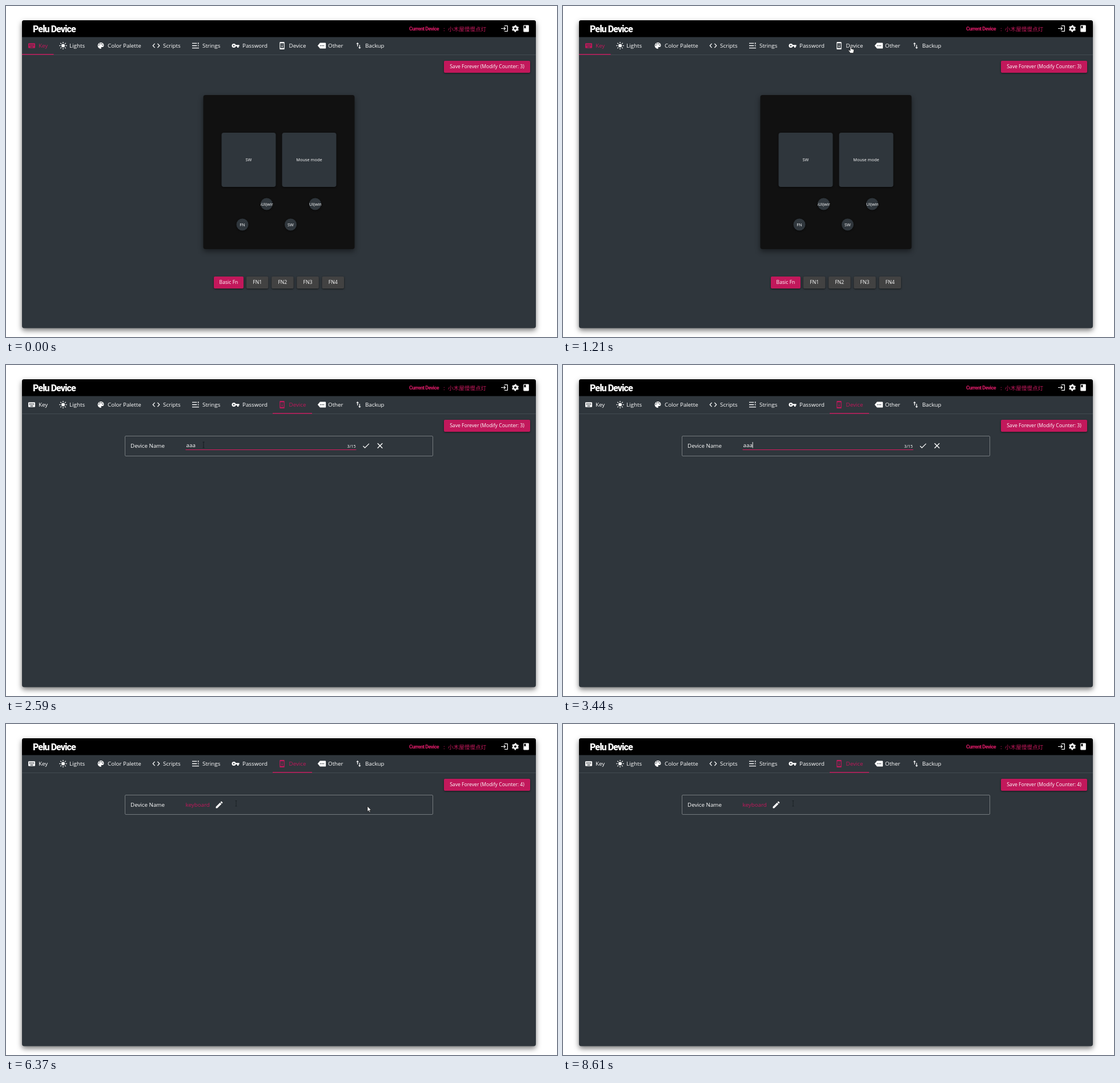
Write an HTML page that moves like this. It is 965x580 px and loops after 9.3 s.

```html
<!DOCTYPE html>
<html lang="en">
<head>
<meta charset="utf-8">
<title>Device settings</title>
<style>
  html, body { margin: 0; width: 100%; height: 100%; overflow: hidden; background: #fff; }
  svg { display: block; font: 9.8px "Open Sans", "Noto Sans", sans-serif; fill: #fff; }
  .pink { fill: #c2185b; }
  .window { filter: drop-shadow(0 4px 5px #0008); }
  .raised { filter: drop-shadow(0 1px 1.5px #0009); }
  .panel { filter: drop-shadow(0 4px 5px #0007); }
  .black { font-family: Roboto, sans-serif; font-weight: 900; }
  .button { font-size: 8.65px; font-weight: 500; text-anchor: middle; }
  .small { font-size: 7.4px; text-anchor: middle; }
  .tab.on { fill: #c2185b; color: #c2185b; }
  .tab { color: #fff; }
  .tab .bar { visibility: hidden; }
  .tab.on .bar { visibility: visible; }
  .line { fill: none; stroke: currentColor; stroke-width: 2.1; }
  .beam { fill: none; stroke: #14191d; stroke-width: .9; }
</style>
</head>
<body>
<svg width="965" height="580" viewBox="0 0 965 580">
  <rect class="window" x="28" y="25" width="900" height="539.5" rx="4" fill="#2f363c"/>
  <path d="M28 54.5V29q0-4 4-4H924q4 0 4 4V54.5z" fill="#000"/>
  <path d="M28 85.5H928" stroke="#424a50"/>
  <text class="black" x="47" y="45.5" font-size="16" letter-spacing="-.95">Pelu Device</text>
  <text class="black pink" x="706" y="43" font-size="9" letter-spacing="-.6">Current Device</text>
  <text class="pink" x="766" y="43.5" font-size="9.6" font-family="Noto Sans CJK SC, Noto Sans CJK, sans-serif">:</text>
  <text class="pink" x="774" y="43.5" font-size="9.6" font-family="Noto Sans CJK SC, Noto Sans CJK, sans-serif">小木屋慢慢点灯</text>
  <g id="headerIcons" color="#fff"></g>
  <g id="tabs"></g>
  <g id="save"></g>

  <g id="keyPage">
    <rect class="panel" x="345.5" y="156" width="265" height="270" rx="4" fill="#111"/>
    <g id="keys"></g>
    <g id="layers"></g>
  </g>

  <g id="devicePage">
    <rect id="row" x="208.5" y="124.5" width="539" height="34" rx="1.5" fill="none" stroke="#747a7e"/>
    <text x="218" y="145">Device Name</text>
    <g id="view">
      <text id="name" class="pink" x="314.5" y="145"></text>
      <g id="pencil"></g>
    </g>
    <g id="edit" color="#fff">
      <rect id="selection" x="315" y="135" width="16" height="11.5" fill="#2a6fc4"/>
      <text id="input" x="315.5" y="144"></text>
      <path id="composing" d="M315.5 146.5H368" stroke="#fff" stroke-width=".8" stroke-dasharray="1 1"/>
      <path id="caret" d="M0 135V145.5" stroke="#fff" stroke-width=".9"/>
      <path d="M314.5 148.5H613.5" stroke="#d81b60" stroke-width="1.2"/>
      <text id="count" x="612.5" y="144.6" font-size="7.2" text-anchor="end"></text>
      <g id="editIcons"></g>
    </g>
    <path id="restingBeam" class="beam" opacity=".75" d="M401.5 134.5h3M403 134.5v9.5M401.5 144h3"/>
    <circle id="badge" cx="315.5" cy="122.5" r="8.3" fill="#2d9cbd"/>
  </g>

  <g id="arrow" stroke="#111" stroke-width=".7">
    <path d="M0 0V9.5L2.2 7.5 3.7 11 5.2 10.3 3.7 7H6.5z"/>
  </g>
  <g id="hand" stroke="#111" stroke-width=".7">
    <path d="M-1 1Q0-1 1 1V5L4.5 6Q5.8 6.5 5.5 8L4.6 12.5H-.8L-3.8 8.4Q-4 6.8-2.4 7.2L-1 8.5z"/>
  </g>
  <path id="beam" class="beam" d="M-1.5-5h3M0-5V5M-1.5 5h3"/>
</svg>

<script>
const LOOP = 9300, STEPS = 54;
const $ = id => document.getElementById(id);

// Icons on a 24-unit grid; entries that begin with "<" are ready markup.
const dot = (x, y, s = 2) => `M${x} ${y}h${s}v${s}h-${s}z`;
const line = d => `<path class="line" d="${d}"/>`;
const rays = [...Array(8).keys()].map(i =>
  `<path class="line" d="M12 1V4.5" transform="rotate(${i * 45} 12 12)"/>`).join('');
const ICONS = {
  keyboard: 'M4 5H20q2 0 2 2V17q0 2-2 2H4q-2 0-2-2V7q0-2 2-2z' +
    [5, 8, 11, 14, 17].map(x => dot(x, 8) + dot(x, 11)).join('') + 'M8 15h8v2H8z',
  sun: `<circle cx="12" cy="12" r="5"/>${rays}`,
  palette: 'M12 3a9 9 0 0 0 0 18q1.5 0 1.5-1.5 0-.6-.4-1-1.2-2.2 1.1-2.5H16a5 5 0 0 0 5-5c0-4.4-4-8-9-8z' +
    [[5, 9], [8, 5], [13, 5], [16, 9]].map(([x, y]) => `M${x} ${y + 1.5}a1.5 1.5 0 0 1 3 0a1.5 1.5 0 0 1-3 0z`).join(''),
  code: line('M8 6L2.5 12 8 18M16 6l5.500 6L16 18'),
  list: line('M2 5H16M2 12H16M2 19H22M20 3V8M20 10.500V14'),
  key: 'M12.650 10A6 6 0 1 0 12.650 14H17v4h4v-4h2v-4zM5 12a2 2 0 0 1 4 0a2 2 0 0 1-4 0z',
  phone: 'M7 1H17q2 0 2 2V21q0 2-2 2H7q-2 0-2-2V3q0-2 2-2zM7 5V19H17V5z' + dot(11, 7) + 'M11 11h2v6h-2z',
  label: 'M7 3.500H22q2 0 2 2v13q0 2-2 2H7L0 12z' + [7.5, 12, 16.5].map(x => dot(x, 10.8, 2.4)).join(''),
  swap: 'M9 3L5 7H8V14h2V7h3zM16 17V10H14v7H11l4 4 4-4z',
  login: 'M11 7L9.600 8.400 12.200 11H2v2H12.200L9.600 15.600 11 17l5-5zM12 3H20q2 0 2 2V19q0 2-2 2H12V19h8V5H12z',
  gear: '<g fill="none" stroke="currentColor"><circle cx="12" cy="12" r="5.600" stroke-width="4.600"/>' +
    '<circle cx="12" cy="12" r="8.600" stroke-width="3" pathLength="12" stroke-dasharray="1" transform="rotate(15 12 12)"/></g>',
  book: 'M6 2H18q2 0 2 2V20q0 2-2 2H6q-2 0-2-2V4q0-2 2-2zM6 4v8l2.500-1.500L11 12V4z',
  pencil: 'M3 17.250V21H6.750L17.800 9.950 14.050 6.200zM20.700 7q.7-.7 0-1.400L18.400 3.300q-.7-.7-1.400 0L15.100 5.100 18.900 8.900z',
  check: 'M9 16.200L4.800 12 3.400 13.400 9 19 21 7 19.600 5.600z',
  cross: line('M5.500 5.500l13 13M18.500 5.500l-13 13'),
};
function icon(name, x, y, scale = .6) {
  const art = ICONS[name];
  const body = art[0] === '<' ? art : `<path fill-rule="evenodd" d="${art}"/>`;
  return `<g transform="translate(${x} ${y}) scale(${scale}) translate(-12 -12)">${body}</g>`;
}
const button = (x, y, w, label, fill) =>
  `<rect class="raised" x="${x}" y="${y}" width="${w}" height="21" rx="2" fill="${fill}"/>
   <text class="button" x="${x + w / 2}" y="${y + 13.3}">${label}</text>`;

$('headerIcons').innerHTML = icon('login', 873, 39.5) + icon('gear', 892, 39.5) + icon('book', 911, 39.5);

const TABS = [
  ['Key', 'keyboard', 45, 57], ['Lights', 'sun', 100, 111], ['Color Palette', 'palette', 166, 178],
  ['Scripts', 'code', 263, 275], ['Strings', 'list', 332, 344], ['Password', 'key', 402, 414],
  ['Device', 'phone', 483.5, 495.5], ['Other', 'label', 553, 564], ['Backup', 'swap', 617.5, 629],
];
$('tabs').innerHTML = TABS.map(([label, art, iconX, textX]) =>
  `<g class="tab" id="tab${label}">${icon(art, iconX, 69.5)}<text x="${textX}" y="73.2">${label}</text>
   ${label === 'Key' ? '<path class="bar" d="M28 84h55.500v1.500H28z"/>' : ''}
   ${label === 'Device' ? '<path class="bar" d="M467 84h69v1.500H467z"/>' : ''}</g>`).join('');

$('save').innerHTML = button(767, 96, 151, 'Save Forever (Modify Counter: 3)', '#c2185b');
const saveLabel = $('save').querySelector('text');

const bigKey = (x, label) =>
  `<rect class="raised" x="${x}" y="222" width="95" height="95" rx="4" fill="#2f363c"/>
   <text class="small" x="${x + 47.5}" y="272">${label}</text>`;
const roundKey = (x, y, label, shift = 0) =>
  `<circle class="raised" cx="${x}" cy="${y}" r="10.5" fill="#2f363c"/>
   <svg x="${x - 10.5}" y="${y - 10.5}" width="21.500" height="21">
   <text class="small" x="${10.5 + shift}" y="13">${label}</text></svg>`;
$('keys').innerHTML = bigKey(377.5, 'SW') + bigKey(483.5, 'Mouse mode') +
  roundKey(456.5, 347, 'GUI(win)') + roundKey(541.5, 347, 'GUI(win)', -1.2) +
  roundKey(414, 383, 'FN') + roundKey(498.5, 383, 'SW');
$('layers').innerHTML = button(364, 474, 52, 'Basic Fn', '#c2185b') +
  [1, 2, 3, 4].map(i => button(376.7 + i * 44.2, 474, 38.5, 'FN' + i, '#424242')).join('');

$('pencil').innerHTML = icon('pencil', 0, 141.5, .66);
$('editIcons').innerHTML = icon('check', 630.5, 141.5, .64) + icon('cross', 655, 141.5, .66);

const show = (id, on) => $(id).style.display = on ? '' : 'none';
const put = (id, text) => { if ($(id).textContent !== text) $(id).textContent = text; };
const mix = (a, b, p) => a + (b - a) * p;
const smooth = p => p * p * (3 - 2 * p);
const glide = (from, to, p) => [mix(from[0], to[0], p), mix(from[1], to[1], p)];

const ENTER = [757, 508], TAB = [504, 70], PENCIL = [346, 140];
const FIELD = [403, 139], CHECK = [632, 144], REST = [633, 144], EXIT = [944, 578];

// Pointer kind and position for a step; null while it is hidden.
function pointer(f) {
  if (f >= 1 && f < 12) {
    const p = 1 - (1 - Math.min(1, (f - 1) / 6)) ** 1.5;
    const bend = [405, 250];
    return [f < 7 ? 'arrow' : 'hand', glide(glide(ENTER, bend, p), glide(bend, TAB, p), p)];
  }
  if (f >= 12 && f < 18) {
    const p = smooth(Math.min(1, (f - 11) / 3));
    return [f < 14 ? 'arrow' : f === 14 ? 'hand' : 'beam', glide(TAB, PENCIL, p)];
  }
  if (f >= 30 && f < 37) {
    const at = glide(FIELD, CHECK, smooth((f - 30) / 6));
    return [at[0] < 614 ? 'beam' : 'hand', at];
  }
  if (f >= 37 && f < 50) return ['arrow', glide(REST, EXIT, smooth(Math.max(0, (f - 42) / 7)))];
  return null;
}

function typed(f) {
  if (f < 22) return 'aaa';
  if (f === 22) return 'k';
  if (f === 23) return "key'bo";
  return f < 27 ? "key'bo'a'r'd" : 'keyboard';
}

function draw(f) {
  const onDevice = f >= 9, editing = f >= 15 && f < 37, saved = f >= 37;
  $('tabKey').classList.toggle('on', !onDevice);
  $('tabDevice').classList.toggle('on', onDevice);
  show('keyPage', !onDevice);
  show('devicePage', onDevice);
  show('view', !editing);
  show('edit', editing);
  $('row').setAttribute('height', editing ? 35 : 34);
  put('name', saved ? 'keyboard' : 'aaa');
  $('pencil').setAttribute('transform', `translate(${saved ? 373.5 : 347} 0)`);
  saveLabel.textContent = `Save Forever (Modify Counter: ${saved ? 4 : 3})`;

  put('input', typed(f));
  put('count', f < 27 ? '3/15' : '8/15');
  show('selection', f === 21);
  const composing = f >= 22 && f < 27;
  show('composing', composing);
  show('badge', f >= 22 && f < 37);
  show('restingBeam', f >= 27);
  show('caret', (f >= 16 && f < 30 && f !== 19 && f !== 21));
  if (editing) {
    const end = 315.8 + $('input').getComputedTextLength();
    $('caret').setAttribute('transform', `translate(${end} 0)`);
    $('composing').setAttribute('d', `M315.5 146.500H${end}`);
  }

  const current = pointer(f);
  for (const kind of ['arrow', 'hand', 'beam']) {
    const active = current !== null && current[0] === kind;
    show(kind, active);
    if (active) $(kind).setAttribute('transform', `translate(${current[1]})`);
  }
}

function tick() {
  const time = performance.now() % LOOP;
  draw(Math.floor((time + 12) / LOOP * STEPS) % STEPS);
  requestAnimationFrame(tick);
}
tick();
</script>
</body>
</html>
```
